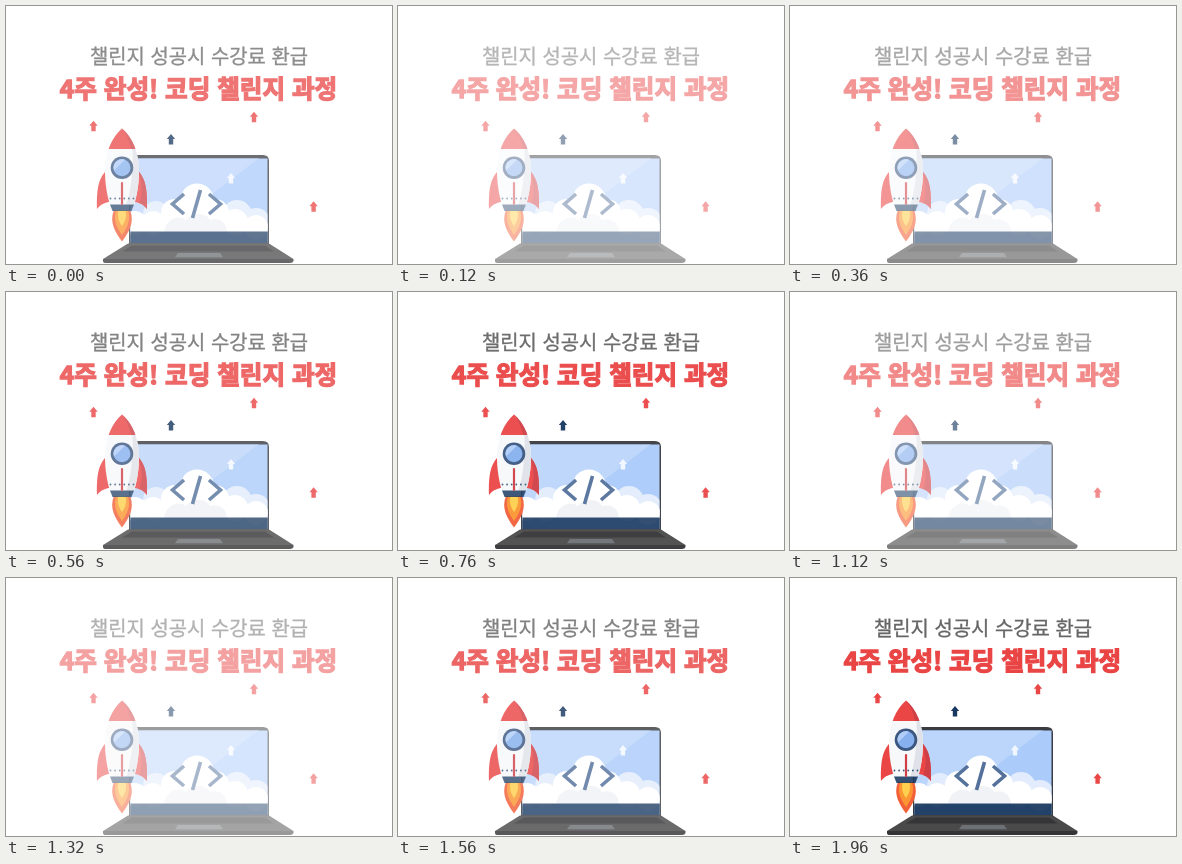
An HTML page for the animation above (2.04 s loop, 386x258 px).

```html
<!DOCTYPE html>
<html lang="ko">
<head>
<meta charset="utf-8">
<title>코딩 챌린지</title>
<style>
  html, body { margin: 0; width: 100%; height: 100%; overflow: hidden; background: #fff; }
  svg { display: block; width: 386px; height: 258px; }
  .banner { animation: pulse 2040ms linear infinite; }
  text { font-family: "Noto Sans CJK KR", "Noto Sans CJK", "Noto Sans CJK JP", sans-serif; text-anchor: middle; }
  .lead { font-size: 19.9px; fill: #666; stroke: #666; stroke-width: .35; }
  .title { font-size: 24.6px; font-weight: 900; fill: #ea4545; stroke: #ea4545; stroke-width: 1.3; }
  .red { fill: #ea4646; }
  .wine { fill: #cf4046; }
  .navy { fill: #17375e; }

  /* quick dip, slow eased recovery, twice per loop */
  @keyframes pulse {
    0%     { opacity: .75; }
    3.92%  { opacity: .53; }
    8.82%  { opacity: .4; }
    11.76% { opacity: .42; }
    17.65% { opacity: .57; }
    27.45% { opacity: .81; }
    37.25% { opacity: .95; }
    47.06% { opacity: 1; }
    49.02% { opacity: .97; }
    50.98% { opacity: .88; }
    54.9%  { opacity: .63; }
    59.8%  { opacity: .41; }
    62.75% { opacity: .44; }
    68.63% { opacity: .63; }
    76.47% { opacity: .82; }
    86.27% { opacity: .95; }
    96.08%, 99.99% { opacity: 1; }
    100%   { opacity: .75; }
  }
</style>
</head>
<body>
<svg viewBox="0 0 386 258">
  <defs>
    <path id="arrow" d="M0-5.500 4.200-.5H2.200V5H-2.200V-.5H-4.200Z"/>
    <clipPath id="screen"><path d="M124.500 152.500H261.500V237H124.500Z"/></clipPath>
    <clipPath id="hull"><path d="M116 122.500C106 131 99.500 146 99 163 98.800 177 101 189 104 199H128C131 189 133.200 177 133 163 132.500 146 126 131 116 122.500Z"/></clipPath>
  </defs>
  <g class="banner">
    <text class="lead" x="193" y="57.600">챌린지 성공시 수강료 환급</text>
    <text class="title" x="192.500" y="92">4주 완성! 코딩 챌린지 과정</text>

    <use href="#arrow" class="red" x="87.500" y="120.300"/>
    <use href="#arrow" class="red" x="248" y="111.300"/>
    <use href="#arrow" class="red" x="307.600" y="200.800"/>
    <use href="#arrow" class="navy" x="165" y="133.500"/>

    <!-- laptop -->
    <path fill="#3a3c41" d="M123 239V155Q123 149 129 149H257Q263 149 263 155V239Z"/>
    <g clip-path="url(#screen)">
      <rect x="123" y="149" width="140" height="90" fill="#abcbfb"/>
      <path fill="#bcd5fb" d="M123 149H257L176 211H123Z"/>
      <g fill="#e2ecfc">
        <circle cx="192" cy="196" r="17"/>
        <circle cx="231" cy="209" r="15"/>
        <circle cx="250" cy="216" r="14"/>
        <circle cx="150" cy="208" r="13"/>
      </g>
      <g fill="#fff">
        <circle cx="191" cy="194" r="16.500"/>
        <circle cx="169" cy="207" r="14"/>
        <circle cx="147" cy="217" r="12"/>
        <circle cx="129" cy="217" r="12"/>
        <circle cx="209" cy="207" r="14"/>
        <circle cx="229" cy="216" r="13"/>
        <circle cx="250" cy="221" r="12"/>
        <rect x="170" y="195" width="38" height="30"/>
        <rect x="123" y="217" width="140" height="9"/>
      </g>
      <path fill="#f1f2f6" d="M158 226C160 213 172 208 180 214 187 205 201 207 204 214 214 211 221 218 221 226Z"/>
      <rect class="navy" x="123" y="225.500" width="140" height="12" fill-opacity=".92"/>
    </g>
    <use href="#arrow" fill="#f2f7ff" x="225" y="172.500"/>
    <path fill="none" stroke="#54719b" stroke-width="3.600" d="M178 188 166.500 198 178 208M194.500 184 186.500 212M203 188 214.500 198 203 208"/>
    <path fill="#4a4a4b" d="M122 237.500H263L287.500 253H97Z"/>
    <path fill="#353537" d="M126 239.500H259L268 245.500H116Z"/>
    <path fill="#6d7175" d="M172 247H214L217 251.200H169Z"/>
    <path fill="#343436" d="M97 253H287.500V255Q287 257 284 257H100Q97 257 97 255Z"/>

    <!-- rocket -->
    <path fill="#f2603a" d="M108 204H124C129 216 123 226 116 235.500 109 226 103 216 108 204Z"/>
    <path fill="#fb9632" d="M110 204H122C125 214 121 222 116 229 111 222 107 214 110 204Z"/>
    <path fill="#fed04e" d="M112.500 204H119.500C121 211 119 216 116 220 113 216 111 211 112.500 204Z"/>
    <path class="red" d="M100 165C93 172 90.500 182 91 203 95 198 100 196 104 196ZM132 165C139 172 141.500 182 141 203 137 198 132 196 128 196Z"/>
    <path class="wine" d="M132 165C139 172 141.500 182 141 203 138.500 199.500 136 198 133.500 197 137 187 136 175 132 165Z"/>
    <g clip-path="url(#hull)">
      <rect x="98" y="122" width="36" height="78" fill="#f7f8fa"/>
      <path fill="#dfe2e8" d="M125 122H134V200H120Q130 170 125 122Z"/>
      <rect class="red" x="98" y="122" width="36" height="21"/>
      <path class="wine" d="M116 122H134V143H125Q123 132 116 122Z"/>
    </g>
    <path class="navy" fill-opacity=".88" d="M104 198.500H128L125.500 205H106.500Z"/>
    <path stroke="#40587a" stroke-width="1.800" stroke-linecap="round" stroke-dasharray="0 4.600" fill="none" d="M104.500 192.500H128"/>
    <circle cx="116" cy="161.700" r="11.300" fill="#3b5780"/>
    <circle cx="116" cy="161.700" r="8.500" fill="#86b0ee"/>
    <path fill="#b0cdf8" d="M108 164.500A8.500 8.500 0 0 1 119 153.700Z"/>
    <rect class="wine" x="114.900" y="176" width="2.200" height="23" rx="1.100"/>
  </g>
</svg>
</body>
</html>
```
